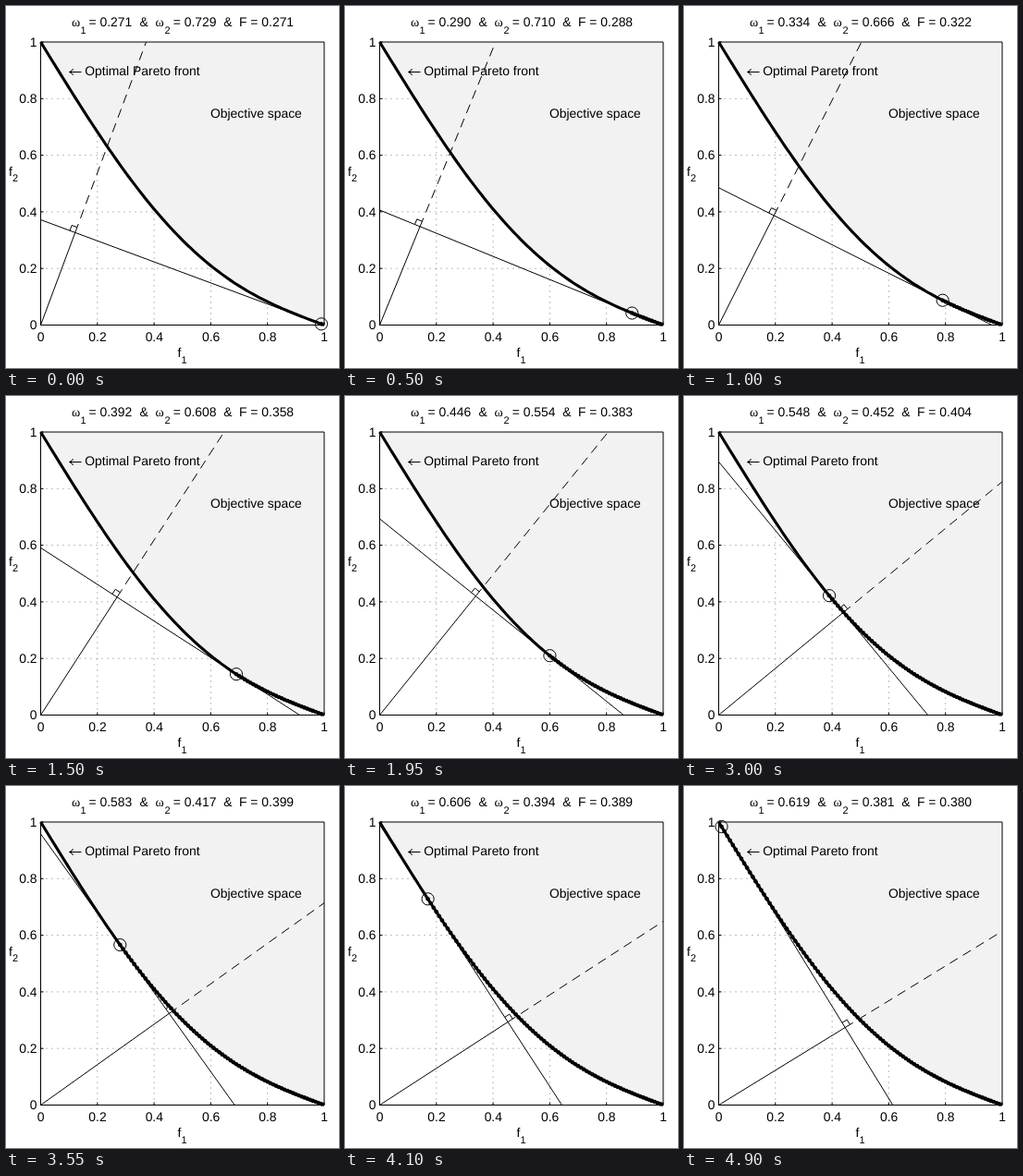
An HTML page with a canvas that plays this animation: 360x392 px, repeating every 4950 ms.

```html
<!DOCTYPE html>
<html lang="en">
<head>
<meta charset="utf-8">
<title>Weighted sum on a Pareto front</title>
<style>
html, body { margin: 0; width: 100%; height: 100%; overflow: hidden; background: #fff; }
canvas { display: block; }
</style>
</head>
<body>
<canvas id="stage" width="360" height="392"></canvas>
<script>
const ctx = document.getElementById('stage').getContext('2d');
const STEP = 50, STEPS = 99, SIZE = 306.5;
const SANS = '"Liberation Sans", Arial, sans-serif';
const SERIF = '"Liberation Serif", "Times New Roman", serif';

const px = v => 37.5 + SIZE * v;
const py = v => 345.5 - SIZE * v;
const front = x => 1 - x - 0.2 * Math.sin(Math.PI * x);
const slope = x => 1 + 0.2 * Math.PI * Math.cos(Math.PI * x);
const truncate = v => Math.floor(v * 1000) / 1000;

// Polyline through points given in plot units.
function trace(points) {
  ctx.beginPath();
  for (const [x, y] of points) ctx.lineTo(px(x), py(y));
}

function line(points, dash = [], color = '#000', width = 1) {
  trace(points);
  ctx.setLineDash(dash);
  ctx.strokeStyle = color;
  ctx.lineWidth = width;
  ctx.stroke();
}

function circle(x, y, r) {
  ctx.beginPath();
  ctx.arc(px(x), py(y), r, 0, 2 * Math.PI);
}

function text(str, x, y, align = 'left', size = 13.9, family = SANS) {
  ctx.font = `${size}px ${family}`;
  ctx.textAlign = align;
  ctx.fillText(str, x, y);
}

const frontPoints = Array.from({ length: 101 }, (_, i) => [i / 100, front(i / 100)]);

function drawArrow(x, y) {
  ctx.beginPath();
  ctx.moveTo(x + 13, y);
  ctx.lineTo(x, y);
  ctx.moveTo(x + 4, y - 3.5);
  ctx.quadraticCurveTo(x + 3, y - 1, x, y);
  ctx.quadraticCurveTo(x + 3, y + 1, x + 4, y + 3.5);
  ctx.stroke();
}

function drawAxes() {
  for (let i = 1; i < 5; i++) {
    line([[i / 5, 0], [i / 5, 1]], [1, 5], '#777');
    line([[0, i / 5], [1, i / 5]], [1, 5], '#777');
  }
  trace([...frontPoints, [1, 1]]);
  ctx.fillStyle = '#f2f2f2';
  ctx.fill();

  ctx.fillStyle = '#000';
  line([[0, 0], [1, 0], [1, 1], [0, 1], [0, 0]]);
  for (let i = 0; i <= 5; i++) {
    const v = i / 5;
    line([[v, 0], [v, 0.01]]);
    line([[0, v], [0.01, v]]);
    text(v, px(v) + 0.2, 362.5, 'center');
    text(v, 33.5, py(v) + 4.8, 'right');
  }
  text('f', 185.5, 380);
  text('1', 189.5, 386.5, 'left', 11);
  text('f', 3, 184);
  text('2', 7, 190, 'left', 11);
  drawArrow(68.5, 71.5);
  text('Optimal Pareto front', 85.3, 75);
  text('Objective space', 221, 121);
  line(frontPoints, [], '#000', 3.1);
}

function drawTitle(w1, F) {
  const shown = truncate(w1);
  text('ω', 71, 22, 'left', 14, SERIF);
  text('1', 80.5, 29.5, 'left', 11);
  text('= ' + shown.toFixed(3), 89.5, 22);
  text('&', 144.5, 22);
  text('ω', 161.5, 22, 'left', 14, SERIF);
  text('2', 171.5, 29.5, 'left', 11);
  text('= ' + (1 - shown).toFixed(3), 180.8, 22);
  text('&', 235.2, 22);
  text('F = ' + truncate(F).toFixed(3), 252, 22);
}

function drawStep(n) {
  const x = (99 - n) / 100, y = front(x), s = slope(x);
  const w1 = s / (1 + s), w2 = 1 - w1, F = w1 * x + w2 * y;
  const norm = Math.hypot(w1, w2);
  const footX = F * w1 / norm ** 2, footY = F * w2 / norm ** 2;
  const reach = 1 / Math.max(w1, w2);
  const ux = 0.02 * w1 / norm, uy = 0.02 * w2 / norm;

  ctx.fillStyle = '#fff';
  ctx.fillRect(0, 0, 360, 392);
  drawAxes();
  drawTitle(w1, F);

  line([[0, F / w2], [F / w1, 0]]);
  line([[0, 0], [footX, footY]]);
  line([[footX, footY], [w1 * reach, w2 * reach]], [10, 6.6]);
  // Right-angle mark
  line([
    [footX + ux, footY + uy],
    [footX + ux - uy, footY + uy + ux],
    [footX - uy, footY + ux],
  ]);

  for (let i = 0; i <= n; i++) {
    const v = (99 - i) / 100;
    circle(v, front(v), 2.3);
    ctx.fill();
  }
  circle(x, y, 6.6);
  ctx.stroke();
}

function tick() {
  drawStep(Math.floor(performance.now() / STEP) % STEPS);
  requestAnimationFrame(tick);
}
ctx.textRendering = 'geometricPrecision';
tick();
</script>
</body>
</html>
```
